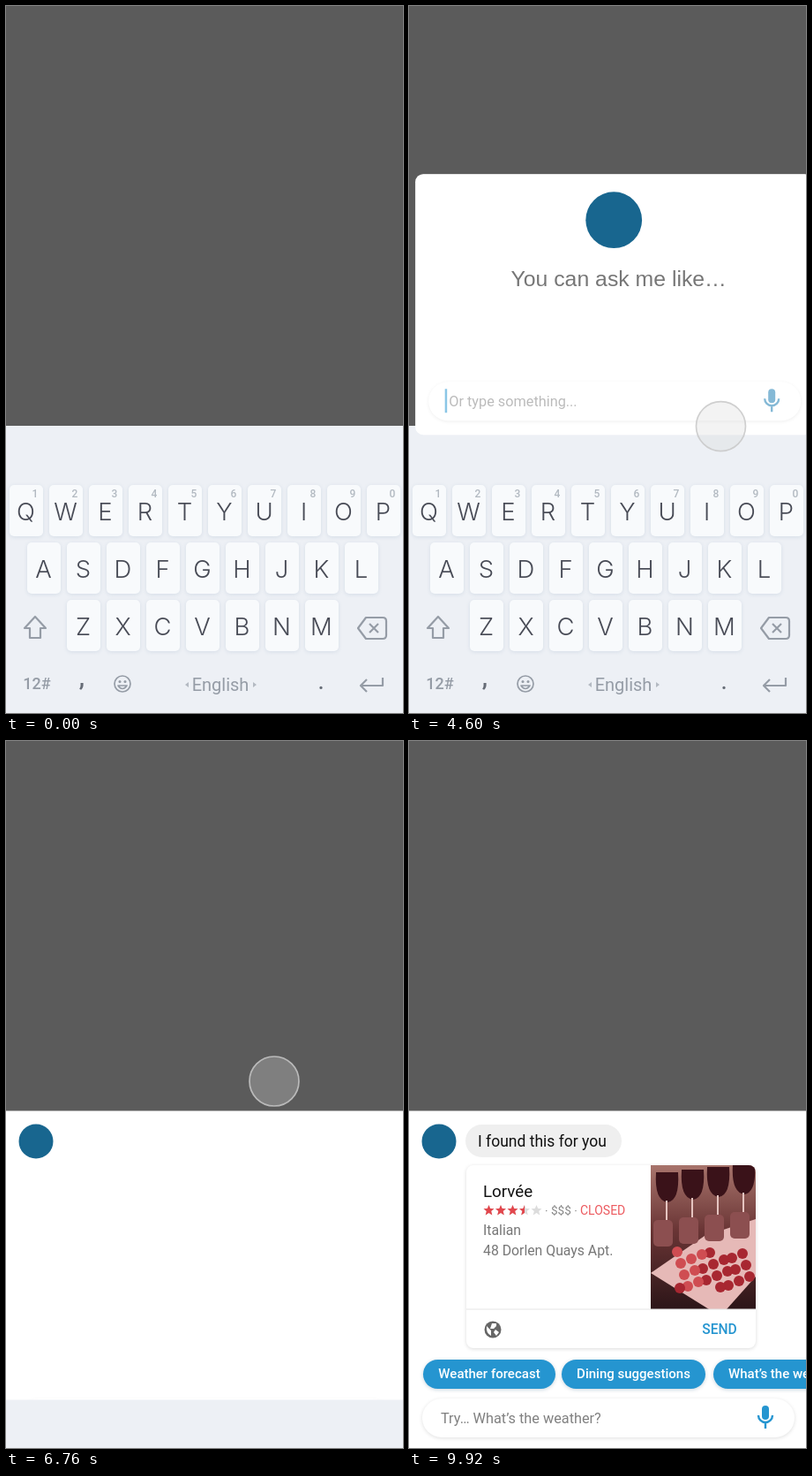
An HTML page with a canvas that plays this animation: 450 by 800 pixels, repeating every 10000 ms.

```html
<!DOCTYPE html>
<html lang="en">
<head>
<meta charset="utf-8">
<title>Keyboard assistant</title>
<style>
  html, body { margin: 0; width: 100%; height: 100%; overflow: hidden; background: #5b5b5b; }
  canvas { display: block; width: 450px; height: 800px; }
</style>
</head>
<body>
<canvas id="stage" width="450" height="800"></canvas>
<script>
const ctx = document.getElementById('stage').getContext('2d');
const LOOP = 10000;
const BLUE = '#2595d0', BRAND = '#18668f', GREY = '#959ca6';
const ROBOTO = 'Roboto, sans-serif', SANS = '"Liberation Sans", Arial, sans-serif', INTER = 'Inter, sans-serif';

const ramp = (t, a, b) => Math.min(1, Math.max(0, (t - a) / (b - a)));
const mix = (a, b, p) => a + (b - a) * p;
const easeOut = u => 1 - (1 - u) ** 3;
const easeInOut = u => u < .5 ? 4 * u ** 3 : 1 - 4 * (1 - u) ** 3;

// Runs a drawing step with its own alpha, offset and scale.
function layer(draw, { alpha = 1, x = 0, y = 0, scale = 1 } = {}) {
  if (alpha <= 0 || scale <= 0) return;
  ctx.save();
  ctx.globalAlpha *= alpha;
  ctx.translate(x, y);
  ctx.scale(scale, scale);
  draw();
  ctx.restore();
}

// y is the middle of the capitals.
function text(s, x, y, size, color, { weight = 400, font = ROBOTO, align = 'left' } = {}) {
  ctx.font = `${weight} ${size}px ${font}`;
  ctx.textAlign = align;
  ctx.fillStyle = color;
  ctx.fillText(s, x, y + size * .355);
}

function box(x, y, w, h, r, color, shadow) {
  ctx.save();
  if (shadow) {
    ctx.shadowColor = shadow;
    ctx.shadowBlur = 4;
    ctx.shadowOffsetY = 1;
  }
  ctx.fillStyle = color;
  ctx.beginPath();
  ctx.roundRect(x, y, w, h, r);
  ctx.fill();
  ctx.restore();
}

// Fades whatever lies below it towards white.
const veil = (x, y, w, h, r, alpha) => layer(() => box(x, y, w, h, r, '#fff'), { alpha });

function disc(x, y, r, color) {
  ctx.fillStyle = color;
  ctx.beginPath();
  ctx.arc(x, y, Math.max(0, r), 0, 7);
  ctx.fill();
}

function shape(d, color, width) {
  const path = new Path2D(d);
  ctx.lineWidth = width || 1;
  ctx.lineJoin = 'round';
  ctx.strokeStyle = ctx.fillStyle = color;
  width ? ctx.stroke(path) : ctx.fill(path);
}

function chip(label, x, y, w, h, size, pad) {
  box(x, y, w, h, h / 2, BLUE, 'rgba(0,60,100,.22)');
  text(label, pad ? x + pad : x + w / 2, y + h / 2 - .5, size, '#fff', { weight: 500, align: pad ? 'left' : 'center' });
}

function mic(x, y, color) {
  box(x - 4, y - 13, 8, 16, 4, color);
  shape(`M${x - 8} ${y - 2}a8 8 0 0 0 16 0M${x} ${y + 6}v7`, color, 2.4);
}

function inputField(y, label, x, micColor) {
  box(15, y - 22, 422, 44, 22, '#fff', 'rgba(0,0,0,.13)');
  text(label, x, y, 16.3, '#808080');
  mic(404, y - 1, micColor);
}

function keyRow(letters, x, y, digits) {
  [...letters].forEach((c, i) => {
    const cx = x + i * 45;
    box(cx - 18.5, y, 38, 58, 5, '#f8fafc', 'rgba(120,150,180,.2)');
    text(c, cx, y + 30.5, 27.5, '#484b56', { weight: 300, font: INTER, align: 'center' });
    if (digits) text(String((i + 1) % 10), cx + 10.5, y + 10, 12, '#b2b9c1', { weight: 500, align: 'center' });
  });
}

function keyboard() {
  box(0, 475, 450, 325, 0, '#edf0f5');
  keyRow('QWERTYUIOP', 22.5, 542, true);
  keyRow('ASDFGHJKL', 42.5, 607);
  keyRow('ZXCVBNM', 87.5, 672);
  shape('M33 691l12 13h-6v11h-12v-11h-6z', GREY, 2.2);
  shape('M408 692h19q4 0 4 4v16q0 4-4 4h-19l-9-12zM412 699l10 10m0-10l-10 10', GREY, 2.2);
  text('12#', 35, 767, 18, GREY, { weight: 500, align: 'center' });
  text(',', 86, 760, 26, '#666c76', { weight: 700, align: 'center' });
  shape('M141 767a9 9 0 1 0-18 0a9 9 0 1 0 18 0M127 769q5 7 10 0z', GREY, 1.7);
  disc(129, 764.5, 1.5, GREY);
  disc(135, 764.5, 1.5, GREY);
  text('English', 243, 768, 20, GREY, { align: 'center' });
  shape('M207 765v6l-4-3zM280 765v6l4-3z', '#b4bac2');
  text('.', 357, 764, 24, '#666c76', { weight: 500, align: 'center' });
  shape('M427 760v9h-25m7-7l-7 7l7 7', GREY, 2.2);
}

function greeting() {
  box(-95, -45, 114, 31, 15.5, '#fff', 'rgba(0,0,0,.22)');
  shape('M-6 -15h12l-6 6z', '#fff');
  text('Hi, I’m Nilta', -38, -30, 16.2, BLUE, { weight: 500, align: 'center' });
}

function suggestions(t) {
  layer(() => {
    chip('What can you do?', 16, 361, 159, 40, 16.3);
    chip('Grab me some food', 185, 361, 181, 40, 16.3);
    chip('Tell me a joke', 376, 361, 140, 40, 16.3, 15);
  }, { x: 450 * (1 - easeOut(ramp(t, 4720, 5280))) });
}

function promptContent(t) {
  text('You can ask me like…', 230.5, 298, 24.8, '#000', { font: SANS, align: 'center' });
  inputField(437, 'Or type something...', 38, '#1b7cb2');
  box(33.5, 423, 2.5, 27, 0, BLUE);
  suggestions(t);
}

// The panel travels with the icon from the keyboard's corner.
function promptPanel(t, open) {
  layer(() => {
    ctx.beginPath();
    ctx.arc(225, 232, 16.5 + 480 * open, 0, 7);
    ctx.clip();
    box(0, 180, 450, 295, 9, '#fff');
    promptContent(t);
    veil(0, 180, 450, 295, 9, 1 - ramp(t, 4440, 4740));
    disc(225, 232, mix(16.5, 32.5, open), BRAND);
  }, { x: 191 * (1 - open), y: 271 * (1 - open) });
}

function photo() {
  ctx.beginPath();
  ctx.roundRect(274, 480, 119, 163, [0, 8, 0, 0]);
  ctx.clip();
  const g = ctx.createLinearGradient(0, 480, 0, 643);
  g.addColorStop(0, '#a8746c');
  g.addColorStop(.45, '#6a3535');
  g.addColorStop(1, '#2c1518');
  ctx.fillStyle = g;
  ctx.fillRect(274, 480, 119, 163);
  shape('M274 602L335 560L393 541V606L360 643H340z', '#e6b9b7');
  for (let i = 0; i < 4; i++) {
    const x = 280 + i * 29, y = 488 - i * 3;
    shape(`M${x} ${y}h25q2 32-12 34q-15-2-13-34z`, '#3a1219');
    shape(`M${x + 12} ${y + 32}v25`, '#e5c4c0', 2);
    box(x - 3, y + 54, 22, 30, 5, '#8c4f50');
  }
  for (let i = 0; i < 24; i++)
    disc(304 + i * 29 % 83, 578 + i * 19 % 44, 6, i % 3 ? '#a82731' : '#cf4d52');
}

function stars() {
  const star = 'M0-6L1.7-2L6-1.8L2.7 1L3.8 5.4L0 3L-3.8 5.4L-2.7 1L-6-1.8L-1.7-2z';
  for (let i = 0; i < 5; i++) layer(() => {
    shape(star, '#dcdcdc');
    ctx.beginPath();
    ctx.rect(-7, -7, Math.min(14, (3.5 - i) * 14), 14);
    if (i < 3.5) {
      ctx.clip();
      shape(star, '#e2474d');
    }
  }, { x: 90.5 + i * 13.5, y: 531 });
}

function results() {
  box(64, 434, 177, 37, 18.5, '#efefef');
  text('I found this for you', 78, 453, 17.5, '#111');
  box(65, 480, 328, 207, 8, '#fff', 'rgba(0,0,0,.14)');
  layer(photo);
  box(65, 642.5, 328, 1, 0, '#e6e6e6');
  text('Lorvée', 84, 509, 18.8, '#111');
  stars();
  text('· $$$ ·', 154, 531, 13.6, '#858585');
  text('CLOSED', 194, 531, 14, '#ec5a5f');
  text('Italian', 84, 553, 15.8, '#777');
  text('48 Dorlen Quays Apt.', 84, 576, 15.8, '#777');
  disc(95, 666, 9.5, '#666');
  shape('M88 662l5 5v6q-6-3-5-11zM94 659h5v3l-3 3h-4zM98 666l4 3l-3 4l-3-4z', '#fff');
  text('SEND', 352, 665.5, 15.6, BLUE, { weight: 500, align: 'center' });
  chip('Weather forecast', 16, 700, 150, 33, 15);
  chip('Dining suggestions', 173, 700, 163, 33, 15);
  chip('What’s the weather?', 345, 700, 175, 33, 15, 17);
}

function answerSheet(t) {
  const p = easeInOut(ramp(t, 6460, 6760)), top = mix(180, 418.5, p), radius = 9 * (1 - p);
  const found = ramp(t, 9760, 9880);
  box(0, top, 450, 800 - top, radius, '#fff');
  if (t < 6600) {
    layer(() => promptContent(t), { y: top - 180 });
    veil(0, top, 450, 800 - top, radius, ramp(t, 6460, 6600));
  } else {
    inputField(766, 'Try… What’s the weather?', 36, BLUE);
    veil(0, 735, 450, 65, 0, 1 - ramp(t, 6700, 6950));
  }
  layer(keyboard, { y: 325 * easeInOut(ramp(t, 6500, 6900)) });
  if (found) {
    layer(results, { y: 16 * (1 - found) });
    veil(60, 425, 390, 275, 0, 1 - found);
    veil(0, 698, 450, 42, 0, 1 - found);
  }
  disc(mix(225, 34, p), mix(232, 453, p), mix(32.5, 19.5, p), BRAND);
  layer(() => text('Grab me some food', 70, 449, 25, BLUE, { weight: 500 }), {
    alpha: ramp(t, 7350, 7550) * (1 - found),
    y: 80 * (1 - easeOut(ramp(t, 7400, 8100)))
  });
}

function touch(t) {
  const a = easeInOut(ramp(t, 4150, 5017));
  const x = mix(416, 304, a), y = mix(503, 385, a ** 2.5);
  const tap = Math.sin(Math.PI * ramp(t, 3960, 4160)) + Math.sin(Math.PI * ramp(t, 6260, 6440));
  layer(() => {
    disc(x, y, 28 - 3 * tap, 'rgba(215,215,215,.29)');
    ctx.lineWidth = 1.7;
    ctx.strokeStyle = 'rgba(200,200,200,.85)';
    ctx.stroke();
  }, { alpha: ramp(t, 3640, 3840) * (1 - ramp(t, 9760, 9860)) });
}

function render(t) {
  box(0, 0, 450, 800, 0, '#5b5b5b');
  if (t < 6460) {
    keyboard();
    const open = easeInOut(ramp(t, 4164, 4718));
    if (open > 0) promptPanel(t, open);
    else disc(416, 503, 16.5 * easeOut(ramp(t, 1000, 1440)), BRAND);
    layer(greeting, {
      x: 416, y: 503,
      alpha: 1 - ramp(t, 4000, 4160),
      scale: easeOut(ramp(t, 2600, 3100))
    });
  } else answerSheet(t);
  touch(t);
}

const start = performance.now();
function tick() {
  render((performance.now() - start) % LOOP);
  requestAnimationFrame(tick);
}
tick();
</script>
</body>
</html>
```
